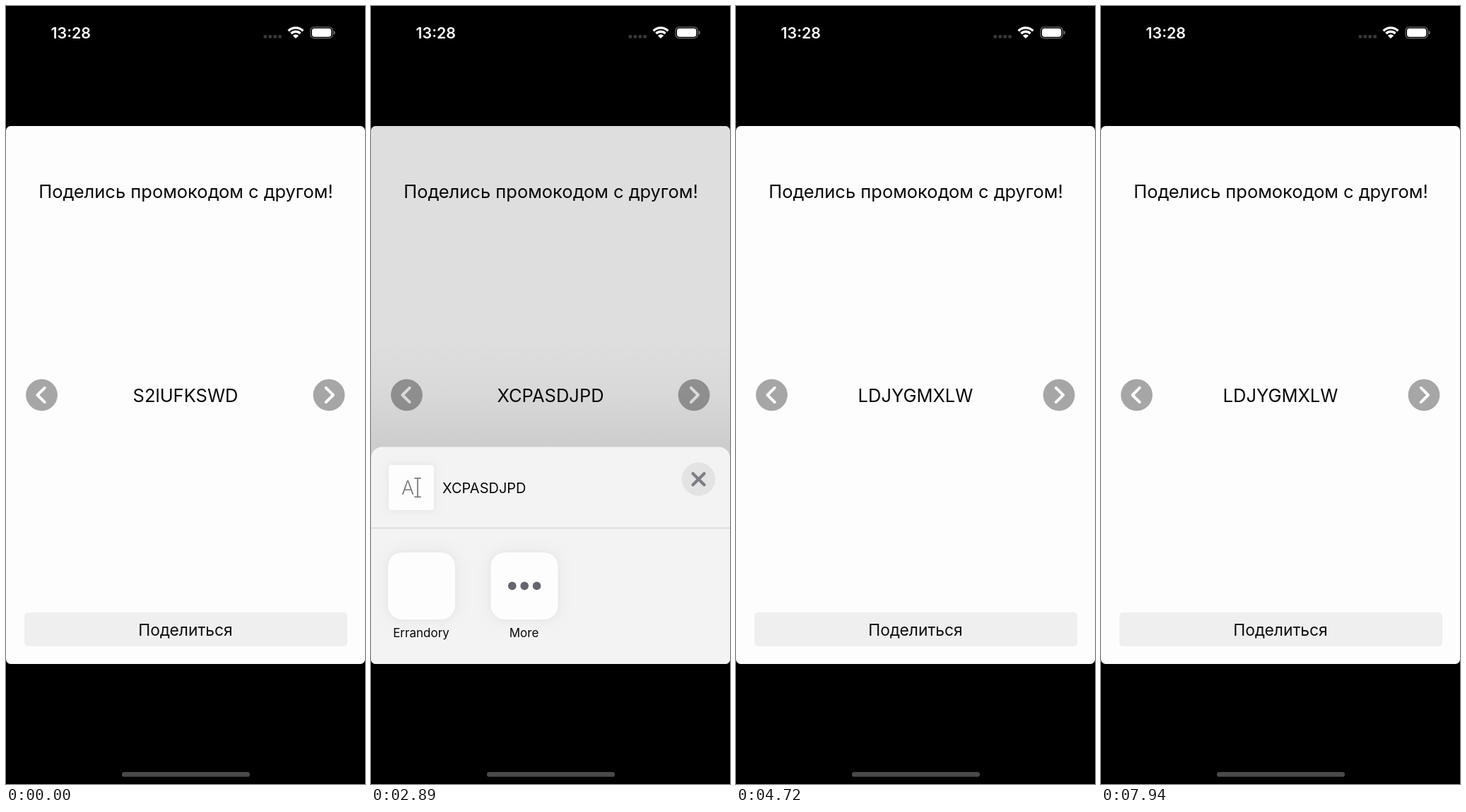
Animation, 508 px wide and 1102 px high, one loop 8000 ms. Source, as an HTML page with a canvas:

```html
<!DOCTYPE html>
<html lang="ru">
<head>
<meta charset="utf-8">
<title>Промокод</title>
<style>
  html, body { margin: 0; width: 100%; height: 100%; overflow: hidden; background: #000; }
  canvas { display: block; width: 508px; height: 1102px; }
</style>
</head>
<body>
<canvas id="stage"></canvas>
<script>
const W = 508, H = 1102, LOOP = 8000;
const TOP = 170, BOTTOM = 932;
const canvas = document.getElementById('stage');
const ctx = canvas.getContext('2d');
const dpr = window.devicePixelRatio || 1;
canvas.width = W * dpr;
canvas.height = H * dpr;

const CODES = [[0, 'S2lUFKSWD'], [560, 'HQVTNERBU'], [1000, 'MKWZSALGC'], [1310, 'XCPASDJPD'], [4660, 'LDJYGMXLW']];
const NEXT_TAPS = [[500, 620], [940, 1000], [1250, 1570], [4660, 4720]];

// open / close: spring starts; grid: a moment on the 60 ms update grid
const SHEETS = [
  { tap: 2510, open: 2750, rest: 483.5, openGrid: 2640, closeTap: 3900, close: 4019, closeGrid: 4090, end: 4660 },
  { tap: 5540, open: 5775, rest: 482.3, openGrid: 5860, closeTap: 7310, close: 7429, closeGrid: 7310, end: 7940 }
];

const clamp = v => Math.max(0, Math.min(1, v));
const ramp = (t, a, b) => clamp((t - a) / (b - a));
const snap = (t, grid) => grid + Math.floor((t - grid) / 60) * 60;
const spring = ms => {
  const x = Math.max(0, ms) * 0.01826;
  return 1 - (1 + x) * Math.exp(-x);
};

function box(x, y, w, h, r, fill) {
  ctx.beginPath();
  ctx.roundRect(x, y, w, h, r);
  if (fill) {
    ctx.fillStyle = fill;
    ctx.fill();
  }
}

function disc(x, y, r, fill) {
  ctx.beginPath();
  ctx.arc(x, y, r, 0, Math.PI * 2);
  ctx.fillStyle = fill;
  ctx.fill();
}

function line(points, color, width) {
  ctx.beginPath();
  points.forEach(([x, y]) => ctx.lineTo(x, y));
  ctx.strokeStyle = color;
  ctx.lineWidth = width;
  ctx.stroke();
}

function outline(d, y) {
  ctx.save();
  ctx.translate(0, y);
  ctx.strokeStyle = '#111';
  ctx.lineWidth = 2.7;
  ctx.stroke(new Path2D(d));
  ctx.restore();
}

function text(str, x, y, size, color = '#080808', align = 'center', weight = 400) {
  ctx.font = `${weight} ${size}px Inter, "Noto Sans", sans-serif`;
  ctx.textAlign = align;
  ctx.fillStyle = color;
  ctx.fillText(str, x, y);
}

function raised(x, y, w, h, r, blur) {
  ctx.save();
  ctx.shadowColor = 'rgba(0,0,0,.07)';
  ctx.shadowBlur = blur * dpr;
  box(x, y, w, h, r, '#fdfdfd');
  ctx.restore();
}

function statusBar() {
  text('13:28', 63.5, 46, 21.4, '#fff', 'left', 600);
  for (let i = 0; i < 4; i++) box(364.5 + i * 6.9, 41, 4.8, 4.8, 1.8, '#39393b');

  ctx.lineCap = 'butt';
  ctx.strokeStyle = '#fff';
  ctx.lineWidth = 3.4;
  for (const r of [14.6, 9.2]) {
    ctx.beginPath();
    ctx.arc(410, 45.5, r, -Math.PI * 0.75, -Math.PI * 0.25);
    ctx.stroke();
  }
  ctx.beginPath();
  ctx.moveTo(410, 46);
  ctx.arc(410, 46, 5.8, -Math.PI * 0.75, -Math.PI * 0.25);
  ctx.fillStyle = '#fff';
  ctx.fill();
  ctx.lineCap = 'round';

  box(431, 29.8, 31.2, 15.8, 5);
  ctx.strokeStyle = '#686868';
  ctx.lineWidth = 1.3;
  ctx.stroke();
  box(433, 31.7, 27.2, 12, 3.4, '#fff');
  box(463.7, 35, 1.9, 5.4, [0, 2, 2, 0], '#777');
}

function arrow(x, dir, press) {
  ctx.globalAlpha = 1 - press * 0.6;
  disc(x, 551, 22.4, '#a6a6a6');
  line([[x - dir * 4.2, 540.8], [x + dir * 6, 551], [x - dir * 4.2, 561.2]], '#fff', 4);
  ctx.globalAlpha = 1;
}

function page(t, code) {
  box(0, TOP, W, BOTTOM - TOP, 0, '#fdfdfd');
  text('Поделись промокодом с другом!', 254.5, 272, 25.5);
  text(code, 254, 561, 25.5);

  let press = 0;
  for (const [a, b] of NEXT_TAPS) {
    if (t >= a && t < b) press = 1 - ramp(t, a + 60, b);
  }
  arrow(50.5, -1, 0);
  arrow(457, 1, press);

  let fade = 0;
  for (const s of SHEETS) {
    if (t >= s.tap) fade = 1 - ramp(t, s.tap + 130, s.tap + 400);
  }
  const v = Math.round(12 + 177 * fade);
  box(26, 859, 457, 48, 5, '#efeff0');
  text('Поделиться', 254, 891.5, 22.8, `rgb(${v},${v},${v})`);
}

function sheetState(t) {
  const s = SHEETS.find(s => t >= s.tap && t < s.end);
  if (!s) return null;
  const shown = spring(snap(t, s.openGrid) - s.open);
  const gone = t < s.closeTap ? 0 : spring(snap(t, s.closeGrid) - s.close);
  const settled = t >= s.openGrid + 540 && t >= s.open + 455 ? 1 : shown;
  return {
    y: BOTTOM - (BOTTOM - s.rest) * settled * (1 - gone),
    dim: 0.122 * Math.min(1, shown * 1.5) * (1 - gone),
    shadow: Math.min(1, shown * 1.4) * clamp(1 - gone * 3),
    press: t < s.closeTap ? 0 : 1 - ramp(t, s.closeTap + 250, s.closeTap + 450)
  };
}

function backdrop({ y, dim, shadow }) {
  ctx.fillStyle = `rgba(0,0,0,${dim})`;
  ctx.fillRect(0, TOP, W, BOTTOM - TOP);
  const g = ctx.createLinearGradient(0, y - 150, 0, y);
  [[0, 0], [0.5, 0.03], [1, 0.085]].forEach(([at, a]) => g.addColorStop(at, `rgba(0,12,5,${a * shadow})`));
  ctx.fillStyle = g;
  ctx.fillRect(0, y - 150, W, 170);
}

function sheet({ y, press }, code) {
  ctx.save();
  ctx.translate(0, y);
  box(0, 0, W, 600, [16, 16, 0, 0], '#f3f3f3');

  raised(25, 25.7, 64, 64, 4, 12);
  text('A', 52, 68, 27, '#7b7b7b', 'center', 300);
  line([[62, 44.5], [70, 44.5]], '#7b7b7b', 1.8);
  line([[66, 44.5], [66, 71]], '#7b7b7b', 1.8);
  line([[62, 71], [70, 71]], '#7b7b7b', 1.8);
  text(code, 101, 65.5, 20, '#080808', 'left');

  disc(463.5, 45.8, 23.7, '#e3e3e4');
  const c = Math.round(125 + 69 * press);
  const cross = `rgb(${c},${c},${Math.round(c + 6 * (1 - press))})`;
  line([[455.5, 37.8], [471.5, 53.8]], cross, 4.2);
  line([[471.5, 37.8], [455.5, 53.8]], cross, 4.2);

  ctx.fillStyle = '#d3d3d5';
  ctx.fillRect(0, 114.4, W, 1.3);

  raised(24, 149.5, 95, 95, 20, 16);
  raised(169.5, 149.5, 95, 95, 20, 16);
  for (const x of [199.8, 217.2, 234.6]) disc(x, 197, 5.8, '#66656f');
  text('Errandory', 71, 269.3, 17);
  text('More', 216.5, 269.3, 17);

  box(25.5, 317.7, 457, 80, 15, '#fdfdfd');
  text('Copy', 51, 367.5, 25.3, '#080808', 'left');
  outline('M432 347V342Q432 338 436 338H446L458 350V366Q458 370 454 370H450M446 338V346Q446 350 450 350H458', 0);
  outline('M428 347H437L449 359V374Q449 378 445 378H428Q424 378 424 374V351Q424 347 428 347ZM437 347V355Q437 359 441 359H449', 0);

  box(25.5, 413.8, 457, 80, 15, '#fdfdfd');
  text('Save to Files', 51, 463.5, 25.3, '#080808', 'left');
  outline('M423 470V444Q423 440 427 440H433Q435 440 437 442L438 443H455Q459 443 459 447V470ZM423 450H459', 0);
  ctx.restore();
}

function draw(t) {
  ctx.setTransform(dpr, 0, 0, dpr, 0, 0);
  ctx.fillStyle = '#000';
  ctx.fillRect(0, 0, W, H);
  ctx.lineCap = ctx.lineJoin = 'round';
  statusBar();
  box(164, 1085, 181, 6.8, 3.4, '#4a4a4a');

  const code = CODES.filter(([at]) => t >= at).pop()[1];
  const state = sheetState(t);
  ctx.save();
  box(0, TOP, W, BOTTOM - TOP, 6.5);
  ctx.clip();
  page(t, code);
  if (state) {
    backdrop(state);
    sheet(state, code);
  }
  ctx.restore();
}

const start = performance.now();
function tick() {
  draw((performance.now() - start) % LOOP);
  requestAnimationFrame(tick);
}
tick();
</script>
</body>
</html>
```
